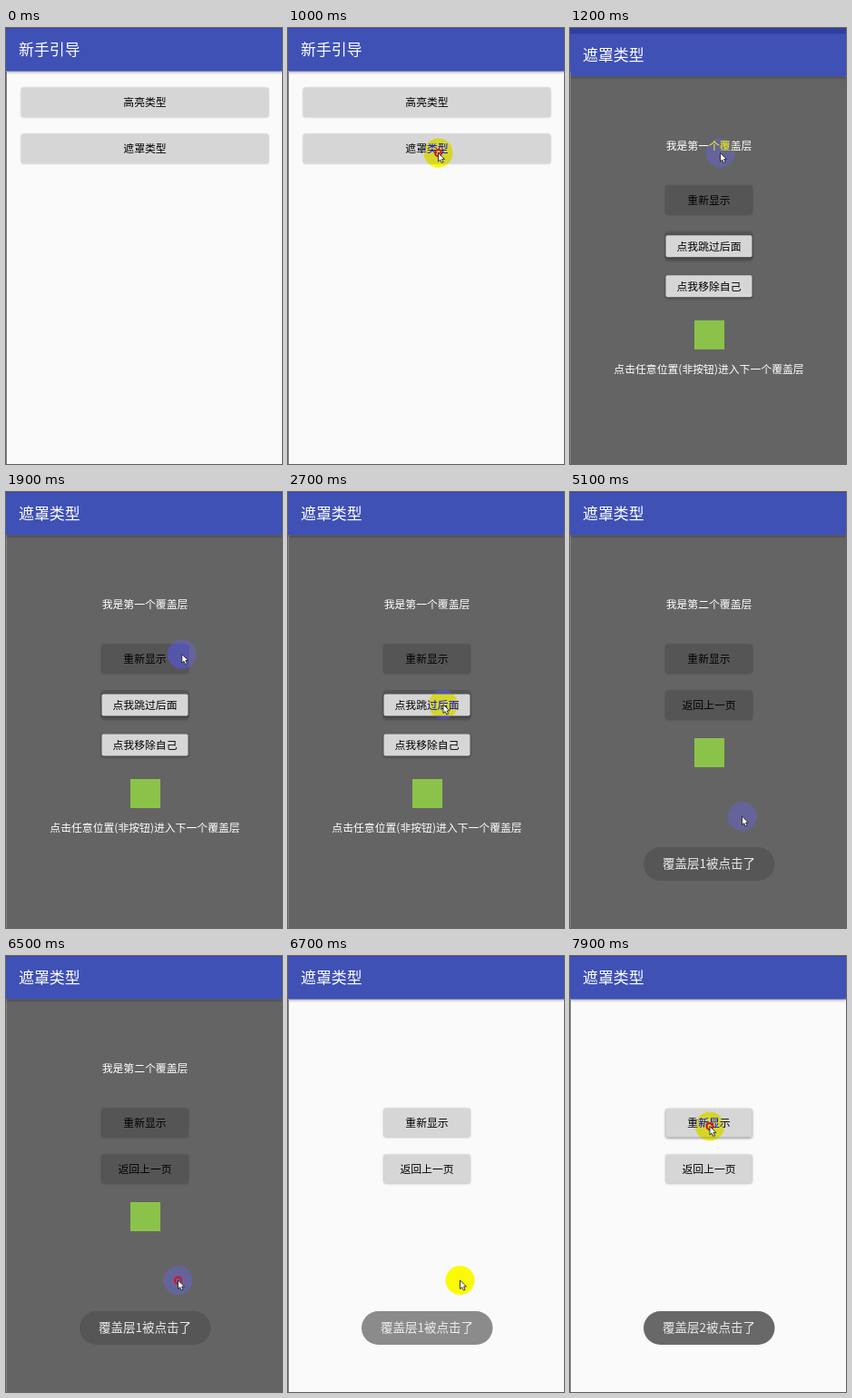
Recreate the animation shown at these times as an HTML page. Size 304 by 480 pixels, loop 8000 ms.

```html
<!DOCTYPE html>
<html lang="zh-CN">
<head>
<meta charset="utf-8">
<style>
  html, body { margin: 0; width: 100%; height: 100%; overflow: hidden; background: #fafafa; }
  svg { display: block; }
  text { font-family: "Noto Sans CJK SC", "Noto Sans CJK JP", sans-serif; text-anchor: middle; }
  .bar { fill: #3f51b5; filter: drop-shadow(0 1px 1.5px #0006); }
  .button { fill: #d6d6d6; filter: drop-shadow(0 .5px .8px #0005); }
  .raised { filter: drop-shadow(0 1.5px 1.5px #0007); }
  #ink { fill: #00f; mix-blend-mode: difference; }
</style>
</head>
<body>
<svg id="stage" width="304" height="480" viewBox="0 0 304 480"></svg>
<script>
const LOOP = 8000, STEP = 100;

const label = (str, x, y, size = 11.85, fill = '#fff', extra = '') =>
  `<text x="${x}" y="${y + size * .37}" font-size="${size}" fill="${fill}" ${extra}>${str}</text>`;

const button = (str, x, y, w, h, cls = '', id = '') =>
  `<rect id="${id}" class="button ${cls}" x="${x}" y="${y}" width="${w}" height="${h}" rx="2"/>` +
  label(str, 153, y + h / 2, 11.85, '#000');

// The status bar colour above each page shows while the page slides up
const page = (id, title, body) => `<g id="${id}">
  <rect width="304" height="480" fill="#fafafa"/>
  <rect class="bar" width="304" height="47.5"/>
  <rect y="-40" width="304" height="40.5" fill="#303f9f"/>
  ${label(title, 14, 24, 16.9, '#fff', 'style="text-anchor:start"')}
  ${body}</g>`;

const layer = (id, str, iconY, body = '') => `<g id="${id}">
  <rect y="47.5" width="304" height="432.5" fill="#000" opacity=".6"/>
  ${label(str, 153, 124)}
  <rect x="137" y="${iconY}" width="33" height="32" fill="#8bc34a"/>
  ${body}</g>`;

const $ = id => document.getElementById(id);

$('stage').innerHTML =
  page('home', '新手引导',
    button('高亮类型', 17, 66, 272, 32) + button('遮罩类型', 17, 117, 272, 32)) +
  page('detail', '遮罩类型',
    button('重新显示', 105.5, 168, 95, 31.5, '', 'again') +
    button('返回上一页', 105.5, 219, 95, 31.5) +
    layer('first', '我是第一个覆盖层', 316,
      button('点我跳过后面', 105.5, 222.5, 95, 24, 'raised') +
      button('点我移除自己', 105.5, 266.5, 95, 24, 'raised') +
      label('点击任意位置(非按钮)进入下一个覆盖层', 153, 370)) +
    layer('second', '我是第二个覆盖层', 271)) +
  `<path d="M.5 48V480" stroke="#808080"/>
  <g id="toast">
    <rect x="81" y="391" width="144.5" height="37" rx="18.5" fill="#555" opacity=".88"/>
    ${label('', 153, 409.5, 13.5, '#eaeaea', 'id="message"')}
  </g>
  <circle id="ink" r="16"/>
  <g id="pointer">
    <circle id="click" r="3.5" fill="none" stroke="#d8101c" stroke-width="2"/>
    <path d="M0 0V9.5L2.2 7.6L3.8 11L5.6 10.2L4.1 6.9H7Z" fill="#fff" stroke="#222" stroke-width=".9"/>
  </g>`;

// Pointer path: time, x, y
const path = [
  [550, 185, -20], [950, 165.5, 137.5], [1400, 165.5, 137.5], [2300, 214, 208],
  [2400, 214, 208], [2500, 220, 214], [2700, 171, 234], [3000, 166, 240],
  [3300, 172, 279], [3400, 172, 279], [3700, 246, 264], [4000, 203, 338.5],
  [4300, 189.5, 357], [6800, 189.5, 357], [7300, 174, 216], [7700, 154, 187.5]
];
const clicks = [[1000, 1100], [4400, 4500], [6500, 6600], [7800, 8000]];

const ramp = (t, from, to) => Math.max(0, Math.min(1, (t - from) / (to - from)));

function pointerAt(t) {
  const next = path.findIndex(p => p[0] > t);
  if (next === 0) return path[0].slice(1);
  if (next < 0) return path[path.length - 1].slice(1);
  const [a, b] = [path[next - 1], path[next]];
  const u = ramp(t, a[0], b[0]), e = u * u * (3 - 2 * u);
  return [1, 2].map(i => a[i] + (b[i] - a[i]) * e);
}

const show = (id, on) => $(id).setAttribute('display', on ? 'inline' : 'none');
const move = (id, x, y) => $(id).setAttribute('transform', `translate(${x} ${y})`);
const fade = (id, alpha) => $(id).setAttribute('opacity', alpha);

function render(t) {
  const open = ramp(t, 1050, 1450);
  show('detail', open > 0);
  fade('detail', Math.min(1, open * 2.8));
  move('detail', 0, 38 * (1 - open) ** 4);
  show('first', t < 4500);
  show('second', t >= 4500 && t < 6600);

  fade('toast', t < 6950 ? ramp(t, 4500, 4900) * (1 - ramp(t, 6580, 7080)) : ramp(t, 6950, 7300));
  $('message').textContent = `覆盖层${t < 6950 ? 1 : 2}被点击了`;
  $('again').classList.toggle('raised', t >= 7800);

  const [x, y] = pointerAt(t);
  move('ink', x, y);
  move('pointer', x, y);
  show('click', clicks.some(([from, to]) => t >= from && t < to));
}

const start = performance.now();
function tick() {
  const t = (performance.now() - start) % LOOP;
  render(Math.floor(t / STEP) * STEP);
  requestAnimationFrame(tick);
}
tick();
</script>
</body>
</html>
```
